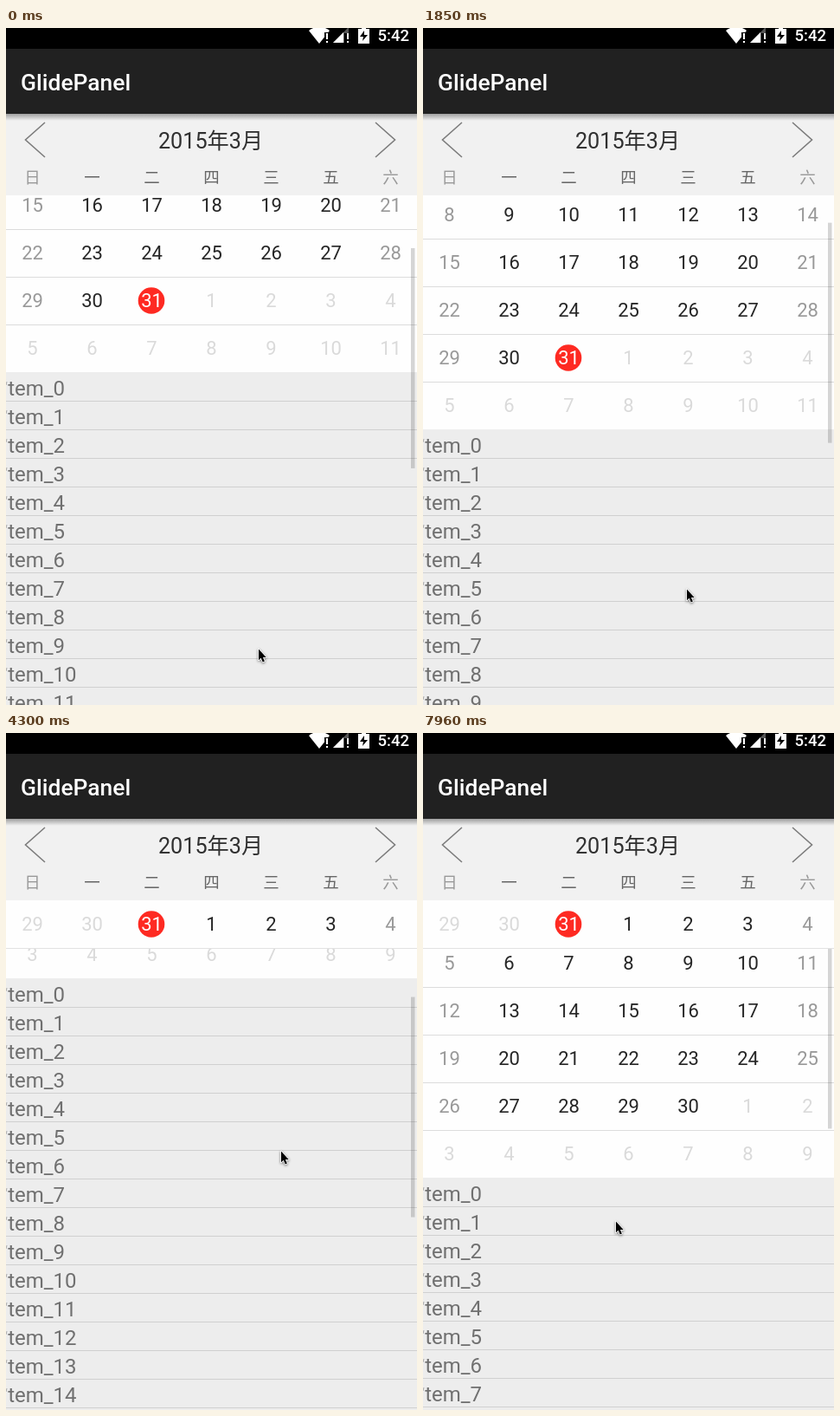
An HTML page with a canvas that plays this animation: 475x781 px, repeating every 8 s.

```html
<!DOCTYPE html>
<html lang="zh">
<head>
<meta charset="utf-8">
<title>Calendar scroll</title>
<style>
html, body { margin: 0; width: 100%; height: 100%; overflow: hidden; background: #ededed; }
canvas { display: block; }
</style>
</head>
<body>
<canvas id="stage" width="475" height="781"></canvas>
<script>
const W = 475, H = 781, LOOP = 8000;
const TOP = 193, ROW = 55, ITEM = 33;
const OPEN = TOP + 6 * ROW, CLOSED = TOP + ROW;
const FONT = 'Roboto, "Noto Sans CJK SC", "Noto Sans CJK", sans-serif';
const ctx = document.getElementById('stage').getContext('2d');

const clamp = (v, lo, hi) => Math.min(hi, Math.max(lo, v));
const mix = (a, b, u) => a + (b - a) * u;
const progress = (t, from, to) => clamp((t - from) / (to - from), 0, 1);
const colX = i => 30.5 + 69 * i;

// The pointer either drags the list or taps an arrow to turn the page.
const drag = (from, to, x, y0, y1) => ({ from, to, x, y0, y1 });
const tap = (from, to, x, y, turn) => ({ from, to, x, y0: y, y1: y, turn });
const actions = [
  drag(0, 1150, 292, 717, 400),
  drag(1240, 2080, 305, 433, 728),
  tap(2540, 2820, 440, 130, 1),
  drag(3330, 3800, 318, 619, 343),
  drag(4180, 4435, 318, 448, 521),
  tap(5130, 5500, 28, 125, -1),
  drag(5970, 6450, 222, 430, 340),
  tap(6780, 7140, 436, 137, 1),
  drag(7450, 8000, 223, 299, 584)
];

function pointer(t) {
  const n = actions.findIndex(a => t < a.to);
  const a = actions[n];
  if (t >= a.from) return [a.x, mix(a.y0, a.y1, progress(t, a.from, a.to))];
  const last = actions[n - 1], u = progress(t, last.to, a.from);
  return [mix(last.x, a.x, u), mix(last.y1, a.y0, u)];
}

function stateAt(t) {
  let y = 397, page = 0, bar = 0;
  for (const a of actions.filter(a => t >= a.from)) {
    if (a.turn) {
      const u = progress(t, a.from + 40, a.from + 260);
      page += a.turn * u * u * (3 - 2 * u);
    } else {
      const moved = (a.y1 - a.y0) * progress(t, a.from, a.to);
      y = clamp(y + moved, CLOSED, OPEN);
      bar = 1 - progress(t, a.to + 300, a.to + 550);
    }
  }
  return { y: Math.round(y), page, bar };
}

function rect(x, y, w, h, color) {
  ctx.fillStyle = color;
  ctx.fillRect(x, y, w, h);
}

function text(str, x, y, size, color, align = 'center', weight = 400) {
  ctx.font = `${weight} ${size}px ${FONT}`;
  ctx.textAlign = align;
  ctx.fillStyle = color;
  ctx.fillText(str, x, y);
}

function shape(points, fill, stroke, width) {
  ctx.beginPath();
  points.forEach(([x, y]) => ctx.lineTo(x, y));
  if (fill) {
    ctx.closePath();
    ctx.fillStyle = fill;
    ctx.fill();
  }
  if (stroke) {
    ctx.strokeStyle = stroke;
    ctx.lineWidth = width;
    ctx.stroke();
  }
}

function exclaim(x, y) {
  rect(x, y, 2, 7, '#fff');
  rect(x, y + 9, 2, 2, '#fff');
}

function week(page, row, x, y) {
  rect(x, y, W, ROW, '#fefefe');
  if (row) rect(x, y, W, 1, '#dcdcdc');
  for (let i = 0; i < 7; i++) {
    const date = new Date(2015, 2, 1 + page * 28 + row * 7 + i);
    const day = date.getDate(), month = date.getMonth();
    let color = month !== 2 + page ? '#dadada' : i % 6 ? '#262626' : '#999';
    if (month === 2 && day === 31) {
      ctx.beginPath();
      ctx.arc(x + colX(i) - 0.5, y + 27.5, 15.3, 0, 7);
      ctx.fillStyle = '#fe2a22';
      ctx.fill();
      color = '#fff';
    }
    text(day, x + colX(i), y + 35, 22, color);
  }
}

function list(y) {
  rect(0, y, W, H - y, '#ededed');
  for (let i = 0; y < H; i++, y += ITEM) {
    text('Item_' + i, -4.4, y + 27, 24, '#707070', 'left');
    shape([[1, y + 11], [0, y + 15]], null, '#aaa', 1);
    rect(0, y + ITEM, W, 1, '#d0d0d0');
  }
}

function calendar({ y, page, bar }) {
  const top = y - 6 * ROW;
  const pages = [0, 1].filter(m => Math.abs(page - m) < 1);
  ctx.save();
  ctx.beginPath();
  ctx.rect(0, TOP, W, H);
  ctx.clip();
  for (const m of pages)
    for (let r = 0; r < 6; r++) week(m, r, (m - page) * W, top + r * ROW);
  list(y);
  rect(468, 198 + (OPEN - y) * 0.444, 4.5, 254, `rgba(0,0,0,${0.16 * bar})`);

  // The selected week sticks below the header.
  for (const m of pages) {
    const row = m ? 0 : 4, x = (m - page) * W;
    if (top + row * ROW >= TOP) continue;
    week(m, row, x, TOP);
    if (y > CLOSED) rect(x, CLOSED, W, 1, '#e2e2e2');
  }
  ctx.restore();
}

function statusBar() {
  rect(0, 0, W, 24, '#000');
  ctx.beginPath();
  ctx.moveTo(350, 3);
  ctx.quadraticCurveTo(362, -6, 374, 3);
  ctx.lineTo(362, 18);
  ctx.fillStyle = '#fff';
  ctx.fill();
  rect(368, 5, 7, 13, '#000');
  exclaim(370, 6);
  shape([[378, 17], [396, 17], [396, -1]], '#555');
  shape([[378, 17], [390, 17], [390, 5]], '#fff');
  rect(391, 6, 6, 12, '#000');
  exclaim(394, 6);
  rect(411, 0, 5, 2, '#fff');
  rect(407, 1, 13, 17, '#fff');
  shape([[414, 3], [409, 10], [413, 10], [412, 15], [418, 8], [414, 8]], '#000');
  text('5:42', 466, 15, 18.5, '#fff', 'right', 500);
}

function header() {
  rect(0, 98, W, TOP - 98, '#f1f1f1');
  const shade = ctx.createLinearGradient(0, 99, 0, 107);
  shade.addColorStop(0, 'rgba(0,0,0,.34)');
  shade.addColorStop(1, 'rgba(0,0,0,0)');
  rect(0, 99, W, 8, shade);
  rect(0, 24, W, 75, '#212121');
  text('GlidePanel', 17, 72, 26.4, '#fff', 'left', 500);
  text('2015年3月', 236.5, 139, 25.2, '#303030');
  for (const [edge, tip] of [[45, 22.5], [427, 449.5]])
    shape([[edge, 109], [tip, 129], [edge, 149]], null, '#7c7c7c', 1.6);
  [...'日一二四三五六'].forEach((c, i) =>
    text(c, colX(i), 179, 18.5, i % 6 ? '#666' : '#999'));
}

function cursor(x, y) {
  ctx.save();
  ctx.translate(Math.round(x) - 0.5, Math.round(y) - 1);
  ctx.scale(0.95, 0.95);
  ctx.lineJoin = 'round';
  const arrow = [[0.5, 0.5], [0.5, 14], [3.4, 11.3], [5.5, 16.2], [7.8, 15.2], [5.7, 10.5], [9.7, 10.5]];
  ctx.shadowColor = 'rgba(0,0,0,.4)';
  ctx.shadowBlur = 3;
  ctx.shadowOffsetY = 1;
  shape(arrow, '#fff', '#fff', 1.8);
  ctx.shadowColor = 'transparent';
  shape(arrow, '#000');
  ctx.restore();
}

const start = performance.now();
function tick() {
  const t = Math.max(0, performance.now() - start) % LOOP;
  calendar(stateAt(t));
  header();
  statusBar();
  cursor(...pointer(t));
  requestAnimationFrame(tick);
}
tick();
</script>
</body>
</html>
```
